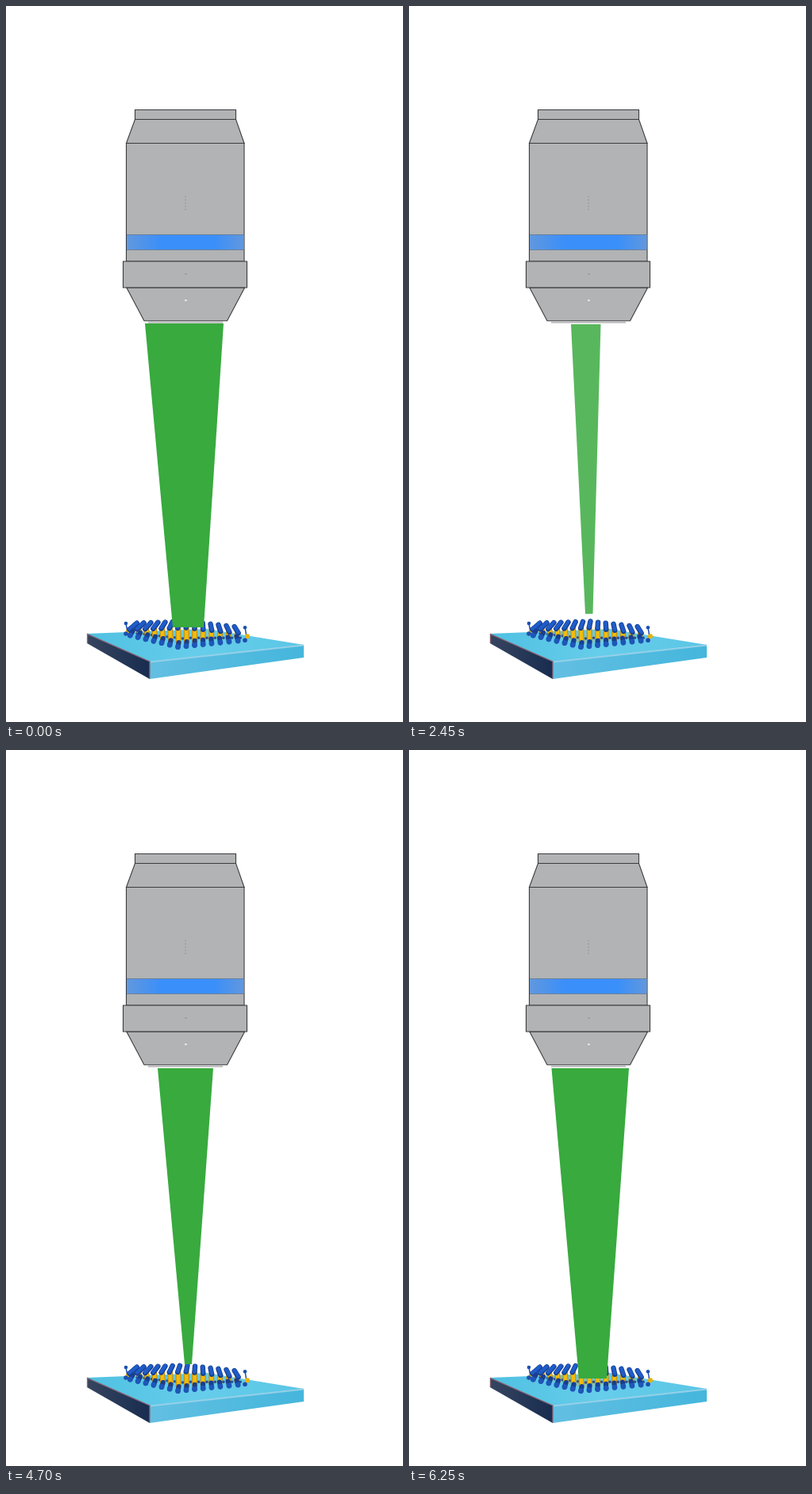
Write an HTML page that moves like this. It is 500 px wide and 900 px high and loops after 6.3 s.

```html
<!DOCTYPE html>
<html lang="en">
<head>
<meta charset="utf-8">
<title>Objective and beam</title>
<style>
  html, body { margin: 0; width: 100%; height: 100%; overflow: hidden; background: #fff; }
  svg { display: block; width: 100vw; height: 100vh; }
</style>
</head>
<body>
<svg viewBox="0 0 500 900">
  <defs>
    <linearGradient id="band">
      <stop offset="0" stop-color="#6198dd"/>
      <stop offset=".3" stop-color="#3a8ffa"/>
      <stop offset=".75" stop-color="#3a8ffa"/>
      <stop offset="1" stop-color="#6198dd"/>
    </linearGradient>
    <linearGradient id="top">
      <stop offset="0" stop-color="#4fc0e2"/>
      <stop offset=".5" stop-color="#66cdea"/>
      <stop offset="1" stop-color="#5bc6e6"/>
    </linearGradient>
    <linearGradient id="side">
      <stop offset="0" stop-color="#62bfe2"/>
      <stop offset="1" stop-color="#45b6dc"/>
    </linearGradient>
    <linearGradient id="dark">
      <stop offset="0" stop-color="#36455f"/>
      <stop offset="1" stop-color="#182c50"/>
    </linearGradient>
  </defs>

  <g id="slab">
    <path d="M102 789L253 783L375 803L181 824Z" fill="url(#top)"/>
    <path d="M181 824L375 803V819L181 846Z" fill="url(#side)"/>
    <path d="M102 789L181 824V846L102 801Z" fill="url(#dark)"/>
    <path d="M182 824.5L375 803.5" stroke="#93d0e8" stroke-width="2"/>
    <path d="M102.5 801V789.5L181 824V845" fill="none" stroke="#8a6674" stroke-width="1.3"/>
  </g>
  <g id="crystal" stroke-linecap="round"></g>
  <path id="beam" fill="#38aa3e"/>

  <g id="objective" fill="#b1b3b4" stroke="#3c3d40" stroke-width="1.1">
    <path d="M179 397.8H273" stroke="#bcbebf" stroke-width="2"/>
    <path d="M162.5 130.5H289.5V142.5H162.5Z"/>
    <path d="M162.5 142.5H289.5L300 172.5H151.5Z"/>
    <path d="M151.5 172.5H300V321H151.5Z"/>
    <path d="M152 287.5H299.5V306.5H152Z" fill="url(#band)" stroke="none"/>
    <path d="M152 287.5H299.5M152 306.5H299.5" stroke="#66788f" stroke-width=".8"/>
    <path d="M147.5 321H303.5V354H147.5Z"/>
    <path d="M152 354.3H300.5L278.5 395.8H174Z"/>
    <path d="M226 239V257" stroke="#8e9092" stroke-dasharray="1.5 2.5"/>
    <path d="M225 337H228" stroke="#8e9092"/>
    <path d="M225 370H228" stroke="#e2e3e3" stroke-width="2"/>
  </g>
</svg>
<script>
const LOOP = 6300, STEP = 50;
const beam = document.getElementById('beam');

// time, top left, top right, top y, bottom left, bottom right, bottom y, opacity
const poses = [
  [0, 175, 274, 399, 210, 249, 781, 1],
  [1500, 195, 251, 400, 216, 238, 753.5, .61],
  [2450, 204, 241.5, 400, 222, 231.5, 764, .84],
  [4000, 197.7, 251.5, 400, 228.5, 228.5, 765, 1],
  [4700, 191, 261, 400, 225, 234, 772, 1],
  [5650, 181.3, 274, 400, 216, 246.5, 787, 1],
  [6250, 179.5, 277, 400, 214, 249, 790, 1]
];

const slope = (i, k) => (poses[i + 1][k] - poses[i][k]) / (poses[i + 1][0] - poses[i][0]);

// Harmonic mean keeps the curve free of overshoot.
function tangent(i, k) {
  if (i === 0 || i === poses.length - 1) return 0;
  const a = slope(i - 1, k), b = slope(i, k);
  return a * b > 0 ? 2 * a * b / (a + b) : 0;
}

function valueAt(t, k) {
  let i = 0;
  while (i < poses.length - 2 && t >= poses[i + 1][0]) i++;
  const p = poses[i], q = poses[i + 1], span = q[0] - p[0];
  const u = Math.min(1, (t - p[0]) / span), v = 1 - u;
  return p[k] * (1 + 2 * u) * v * v + q[k] * u * u * (3 - 2 * u)
    + span * u * v * (tangent(i, k) * v - tangent(i + 1, k) * u);
}

function buildCrystal() {
  const parts = [];
  const rod = (x1, y1, x2, y2, color, width) => parts.push(
    `<path d="M${x1} ${y1}L${x2} ${y2}" stroke="${color}" stroke-width="${width}"/>`);
  const dot = (x, y, r, color) => parts.push(
    `<circle cx="${x}" cy="${y}" r="${r}" fill="${color}"/>`);
  const columns = 16;

  for (let i = 0; i < columns; i++) {
    const x = 151 + 9.1 * i + .06 * i * i;
    const lean = 10.5 - 1.1 * i;
    const back = i < 8 ? 776 - .3 * i : 773.5 + 1.1 * (i - 8);
    const front = i < 7 ? 789 + 2.4 * i : 806 - 1.1 * (i - 7);
    const foot = x - lean * .4;
    const middle = (back + 8 + front) / 2;

    if (i === 0 || i === columns - 1) {
      rod(x, back, x + 2, middle, '#1c50b0', 1.5);
      rod(x + 2, middle, x, front, '#c89a1c', 2);
      dot(x, back, 2.3, '#1c50b0');
      dot(x + 3, middle - 1, 3, '#e9b20c');
      dot(x, front, 2.8, '#1d4fae');
      continue;
    }
    rod(x - lean * .3, back + 8, foot + lean * .3, front - 6, '#c9930f', 7);
    rod(x - lean * .3, back + 8, foot + lean * .3, front - 7, '#f2bd0c', 4.4);
    dot(x + 5, middle + 1, 1.8, '#2a4f94');
    rod(foot + lean * .35, front - 6, foot, front, '#173f92', 6);
    dot(foot, front - .5, 3.4, '#1f56b8');
    rod(x + lean * .5, back, x - lean * .5, back + 8, '#173f92', 6.4);
    rod(x + lean * .5, back - .5, x - lean * .5, back + 7, '#1f5cc8', 4.4);
  }
  document.getElementById('crystal').innerHTML = parts.join('');
}

function draw(now) {
  const t = Math.floor((now % LOOP) / STEP) * STEP;
  const [tl, tr, ty, bl, br, by, alpha] = [1, 2, 3, 4, 5, 6, 7].map(k => valueAt(t, k));
  beam.setAttribute('d', `M${tl} ${ty}H${tr}L${br} ${by}H${bl}Z`);
  beam.setAttribute('fill-opacity', alpha);
}

buildCrystal();
const start = performance.now();
draw(0);
requestAnimationFrame(function tick() {
  draw(performance.now() - start);
  requestAnimationFrame(tick);
});
</script>
</body>
</html>
```
